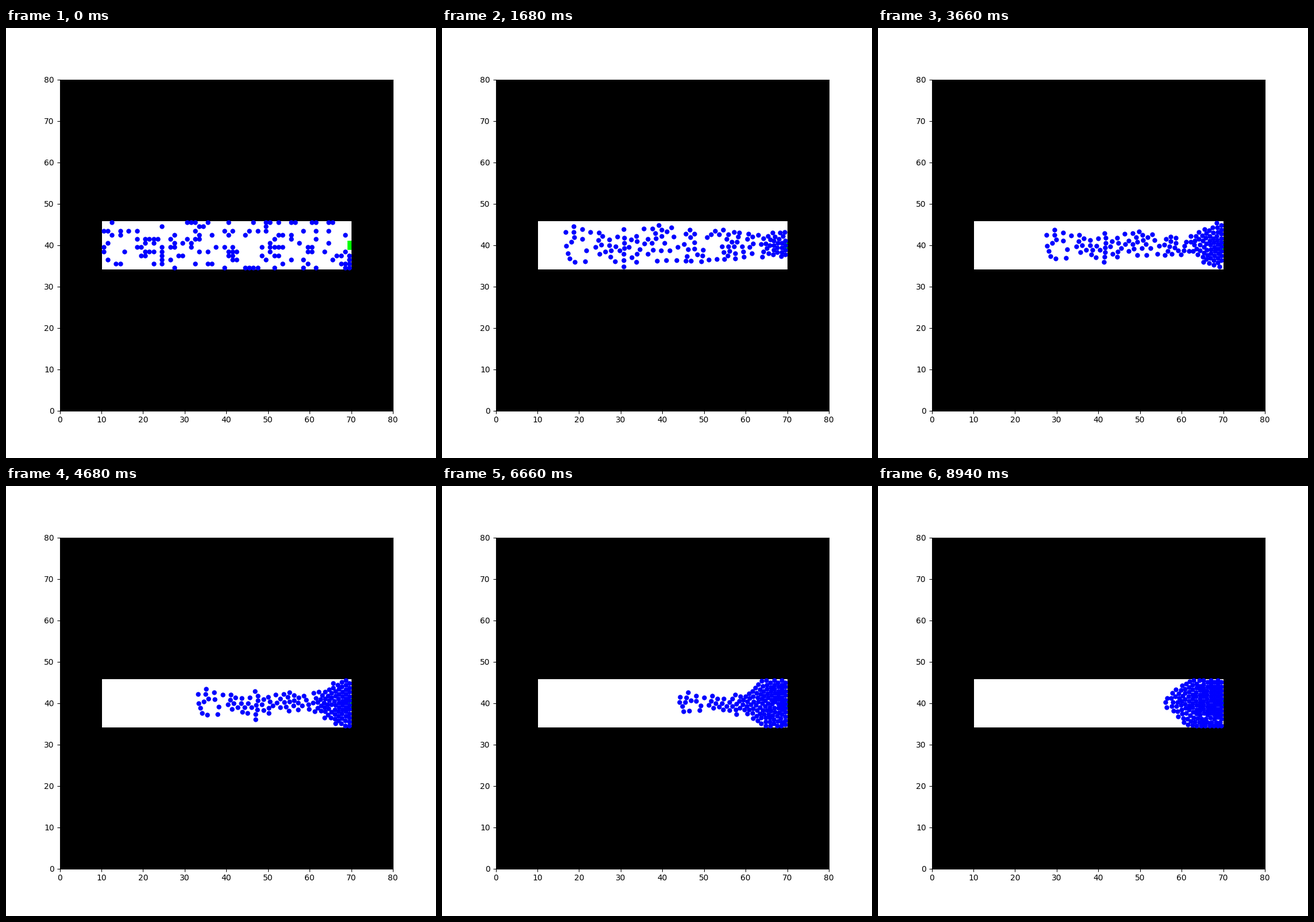
Animation of 748x748 px, one loop 9 s. Source, as a matplotlib script:

```python
import numpy as np
import matplotlib.pyplot as plt
from matplotlib.animation import FuncAnimation
from matplotlib.patches import Rectangle

FRAMES, INTERVAL, SUBSTEPS = 150, 60, 10
SPEED, RELAX = 0.333, 10.0          # cells per frame, frames
PUSH, REACH, DAMP = 0.13, 0.05, 0.3  # contact force at one cell, its decay, loss
LEFT, RIGHT, BOTTOM, TOP = 10, 70, 34, 46
GOAL = np.array([69.8, 40.0])

# Occupied columns of the corridor, from the top row down
ROWS = [
    [12, 30, 31, 32, 35, 40, 46, 49, 50, 52, 55, 56, 60, 61, 64, 65],
    [24, 33, 34, 49],
    [10, 11, 14, 16, 18, 32, 39, 41, 45, 47, 49, 58, 61, 64],
    [12, 14, 27, 33, 36, 40, 44, 52, 53, 55, 68],
    [18, 20, 21, 22, 23, 26, 30, 32, 33, 51, 55, 61],
    [11, 20, 22, 27, 29, 31, 50, 57, 64],
    [10, 18, 19, 24, 26, 27, 31, 37, 39, 41, 48, 50, 51, 52, 53, 59, 60],
    [10, 15, 20, 21, 22, 24, 33, 35, 40, 41, 42, 50, 59, 60, 63, 68],
    [19, 20, 24, 28, 29, 40, 41, 48, 51, 52, 66, 67, 69],
    [11, 24, 26, 41, 42, 49, 55, 58, 65, 69],
    [13, 14, 22, 24, 32, 35, 36, 53, 59, 67, 68, 69],
    [27, 39, 44, 45, 46, 47, 51, 58, 61, 68, 69],
]


def repel(dist):
    return np.minimum(PUSH * np.exp((1 - dist) / REACH), 3.0)


def acceleration(pos, vel):
    # Head for the exit
    to_goal = GOAL - pos
    dist = np.maximum(np.hypot(*to_goal.T), 0.5)
    acc = (SPEED * to_goal / dist[:, None] - vel) / RELAX

    # Push apart neighbours, losing some energy while they close in
    i, j = np.nonzero(np.triu(gap_matrix(pos) < 1.5, 1))
    delta = pos[i] - pos[j]
    gap = np.maximum(np.hypot(*delta.T), 1e-6)
    normal = delta / gap[:, None]
    closing = np.maximum(-np.sum((vel[i] - vel[j]) * normal, axis=1), 0)
    force = repel(gap) + DAMP * closing * (gap < 1.15)
    push = force[:, None] * normal
    np.add.at(acc, i, push)
    np.add.at(acc, j, -push)

    # Walls act like mirrored neighbours
    x, y = pos.T
    acc[:, 0] += repel(2 * (x - LEFT)) - repel(2 * (RIGHT - x))
    acc[:, 1] += repel(2 * (y - BOTTOM)) - repel(2 * (TOP - y))
    return acc


def gap_matrix(pos):
    dx = pos[:, None, 0] - pos[None, :, 0]
    dy = pos[:, None, 1] - pos[None, :, 1]
    return np.hypot(dx, dy)


def simulate():
    pos = np.array([(col + 0.5, 45.5 - k)
                    for k, row in enumerate(ROWS) for col in row])
    vel = np.zeros_like(pos)
    step = 1 / SUBSTEPS
    track = [pos.copy()]
    for _ in range(FRAMES - 1):
        for _ in range(SUBSTEPS):
            vel += acceleration(pos, vel) * step
            pos += vel * step
        pos[:, 0] = np.clip(pos[:, 0], LEFT + 0.3, RIGHT - 0.35)
        pos[:, 1] = np.clip(pos[:, 1], BOTTOM + 0.35, TOP - 0.35)
        track.append(pos.copy())
    return track


track = simulate()

fig = plt.figure(figsize=(7.48, 7.48), dpi=100)
ax = fig.add_axes([0.125, 0.11, 0.775, 0.77])
ax.set_xlim(0, 80)
ax.set_ylim(0, 80)
ax.set_facecolor("black")
ax.add_patch(Rectangle((10.14, 34.13), 59.9, 11.67, fc="white", lw=0))
ax.add_patch(Rectangle((69.07, 38.85), 0.97, 2.22, fc="lime", lw=0))
dots, = ax.plot([], [], "o", color="blue", ms=5)


def draw(frame):
    dots.set_data(*track[frame].T)
    return dots,


anim = FuncAnimation(fig, draw, frames=FRAMES, interval=INTERVAL,
                     repeat=True, repeat_delay=0)
plt.show()
```
